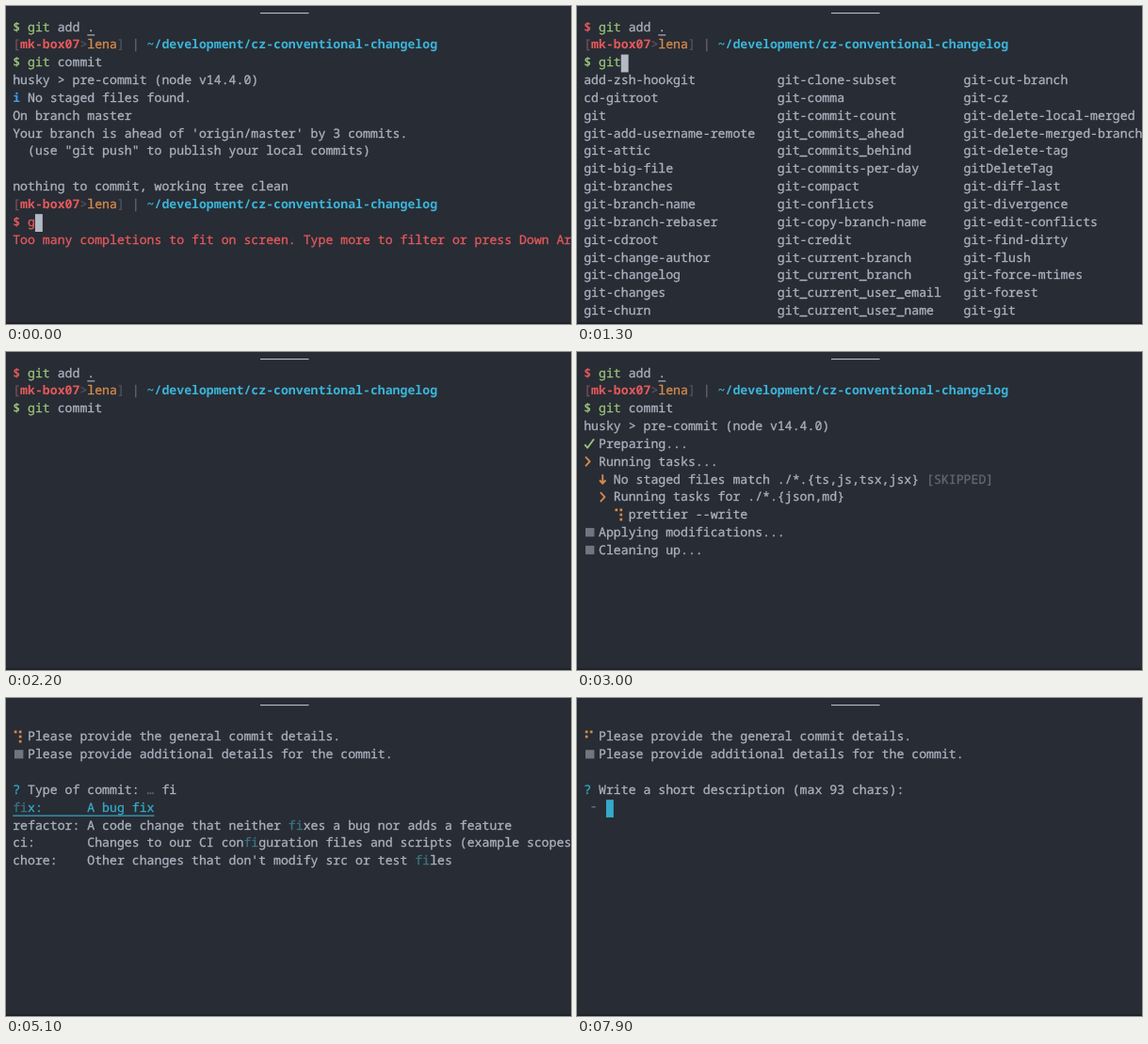
Animation, 600 px wide and 338 px high, one loop 8000 ms. Source, as an HTML page with a canvas:

```html
<!DOCTYPE html>
<html lang="en">
<head>
<meta charset="utf-8">
<title>Commit prompt</title>
<style>
  html, body { margin: 0; width: 100%; height: 100%; overflow: hidden; background: #282c34; }
  canvas { display: block; width: 600px; height: 338px; }
</style>
</head>
<body>
<canvas id="stage"></canvas>
<script>
const W = 600, H = 338, LOOP = 8000;
const X0 = 7.2, Y0 = 13.2, CW = 7.91, RH = 18.84, BASE = 13.4;
const FACE = '13.18px "Noto Sans Mono", "DejaVu Sans Mono", monospace';
const C = {
  bg: '#282c34', text: '#abb2bf', red: '#e4595c', green: '#98c379', orange: '#d58a4c',
  path: '#3cb4d8', cyan: '#35a9c8', match: '#3b7384', dim: '#626873', faint: '#57505a',
  bracket: '#75505a', square: '#70767f', blue: '#3f9bee', cursor: '#b3bac5'
};

const canvas = document.getElementById('stage');
const ctx = canvas.getContext('2d');
const dpr = window.devicePixelRatio || 1;
canvas.width = W * dpr;
canvas.height = H * dpr;

const COMMANDS = [
  'add-zsh-hookgit cd-gitroot git git-add-username-remote git-attic git-big-file git-branches git-branch-name git-branch-rebaser git-cdroot git-change-author git-changelog git-changes git-churn',
  'git-clone-subset git-comma git-commit-count git_commits_ahead git_commits_behind git-commits-per-day git-compact git-conflicts git-copy-branch-name git-credit git-current-branch git_current_branch git_current_user_email git_current_user_name',
  'git-cut-branch git-cz git-delete-local-merged git-delete-merged-branches git-delete-tag gitDeleteTag git-diff-last git-divergence git-edit-conflicts git-find-dirty git-flush git-force-mtimes git-forest git-git'
].map(s => s.split(' '));
const COMMAND_COLS = [0, 26, 51];

const SUBCOMMANDS = [
  ['column', 'display data in columns'],
  ['commit-graph', 'write and verify Git commit-graph files'],
  ['commit', 'record changes to repository'],
  ['commit-tree', 'create new commit object'],
  ['config', 'get and set repository or global options'],
  ['copy-branch-name', 'Copy the current branch name to the clipboard (pbcopy)'],
  ['count-objects', 'count unpacked objects and display their disk consumption'],
  ['cvsexportcommit', 'export a single commit to a CVS checkout'],
  ['get-tar-commit-id', 'extract commit ID from an archive created using git-archive'],
  ['incoming', 'Fetch remote tracking branch, and list incoming commits'],
  ['rank-contributors', 'A simple script to trace through the logs and rank contributors'],
  ['run-command-on-revisions', 'Runs a given command over a range of Git revisions'],
  ['verify-commit', 'check GPG signature of commits']
];

const TYPES = [
  ['feat', 'A new feature'],
  ['fix', 'A bug fix'],
  ['docs', 'Documentation only changes'],
  ['style', 'Changes that do not affect the meaning of the code (white-space, formatting)'],
  ['refactor', 'A code change that neither fixes a bug nor adds a feature'],
  ['perf', 'A code change that improves performance'],
  ['test', 'Adding missing tests or correcting existing tests'],
  ['build', 'Changes that affect the build system or external dependencies (example scopes)'],
  ['ci', 'Changes to our CI configuration files and scripts (example scopes)'],
  ['chore', "Other changes that don't modify src or test files"],
  ['revert', 'Reverts a previous commit']
].map(([name, info]) => (name + ':').padEnd(10) + info);

const cellX = col => X0 + col * CW;
const cellY = row => Y0 + row * RH;

// Writes text on the terminal grid and returns the next free column.
function put(row, col, text, color = C.text, bold = false) {
  ctx.font = (bold ? 'bold ' : '') + FACE;
  ctx.fillStyle = ctx.strokeStyle = color;
  ctx.lineWidth = bold ? 0.01 : 0.3;
  const y = cellY(row) + BASE;
  for (const ch of text) {
    if (ch !== ' ') {
      ctx.fillText(ch, cellX(col), y);
      ctx.strokeText(ch, cellX(col), y);
    }
    col++;
  }
  return col;
}

function box(x, y, w, h, color) {
  ctx.fillStyle = color;
  ctx.fillRect(x, y, w, h);
}

// Draws an open line through points given relative to a cell.
function mark(row, col, color, points) {
  ctx.strokeStyle = color;
  ctx.lineWidth = 1.9;
  ctx.beginPath();
  for (const [x, y] of points) ctx.lineTo(cellX(col) + x, cellY(row) + y);
  ctx.stroke();
}

const tick = row => mark(row, 0, C.green, [[1, 9.8], [4, 13.2], [10.8, 4]]);
const chevron = (row, col) => mark(row, col, C.orange, [[1.8, 4], [6.4, 9], [1.8, 14]]);

function downArrow(row, col) {
  mark(row, col, C.orange, [[4.2, 4], [4.2, 13.5]]);
  mark(row, col, C.orange, [[1, 10], [4.2, 13.5], [7.4, 10]]);
}

function underline(row, col, count, color) {
  box(cellX(col), cellY(row) + 17.1, count * CW, 1.2, color);
}

function cursor(row, col, color = C.cursor) {
  box(cellX(col), cellY(row) + 0.7, CW, RH, color);
}

function square(row) {
  box(9, cellY(row) + 4.3, 9.4, 9.2, C.square);
}

// Braille spinner: each string lists the lit dots, 1-3 left, 4-6 right.
const SPIN = ['124', '145', '1456', '456', '3456', '356', '236', '1236', '123', '1234'];
function spinner(row, col, step) {
  for (const d of SPIN[((step % 10) + 10) % 10]) {
    const x = cellX(col) + (d > 3 ? 6.6 : 1.6);
    const y = cellY(row) + 2.6 + ((d - 1) % 3) * 5.1;
    box(x, y, 2.7, 2.7, C.orange);
  }
}

function promptLine(row) {
  let c = put(row, 0, '[', C.bracket);
  c = put(row, c, 'mk-box07', C.red, true);
  c = put(row, c, '>', C.faint);
  c = put(row, c, 'lena', C.orange);
  c = put(row, c, '] ', C.faint);
  c = put(row, c, '| ', C.dim);
  put(row, c, '~/development/cz-conventional-changelog', C.path, true);
}

function command(row, text, ok, active) {
  put(row, 0, '$', ok ? C.green : C.red, true);
  const known = text.startsWith('git');
  const head = known ? 3 : text.length;
  if (active) cursor(row, 2 + text.length);
  put(row, 2, text.slice(0, head), known ? C.green : C.red);
  put(row, 2 + head, text.slice(head));
  if (text.endsWith(' .')) underline(row, 1 + text.length, 1, C.text);
}

function tooMany(row) {
  put(row, 0, 'Too many completions to fit on screen. Type more to filter or press Down Arrow', C.red);
}

function commandList(row) {
  COMMANDS.forEach((names, i) => names.forEach((n, j) => put(row + j, COMMAND_COLS[i], n)));
}

function subList(row, query) {
  SUBCOMMANDS.filter(([name]) => query === 'com' || name.includes(query))
    .forEach(([name, info], i) => {
      put(row + i, 0, name);
      put(row + i, 26, info);
    });
}

function history() {
  command(0, 'git add .', true);
  promptLine(1);
  command(2, 'git commit', true);
  put(3, 0, 'husky > pre-commit (node v14.4.0)');
  put(4, 0, 'i', C.blue, true);
  put(4, 2, 'No staged files found.');
  put(5, 0, 'On branch master');
  put(6, 0, "Your branch is ahead of 'origin/master' by 3 commits.");
  put(7, 2, '(use "git push" to publish your local commits)');
  put(9, 0, 'nothing to commit, working tree clean');
  promptLine(10);
}

function typeAdd(t) {
  const text = 'git add .'.slice(0, 1 + Math.floor(t / 100));
  if (t < 200) {
    history();
    command(11, text, false, true);
    tooMany(12);
    return;
  }
  put(0, 0, 'nothing to commit, working tree clean');
  promptLine(1);
  command(2, text, false, t < 900);
  if (t < 300) commandList(3);
  if (t >= 900) {
    promptLine(3);
    command(4, 'gi'.slice(0, (t - 900) / 100), true, true);
    if (t >= 1000) tooMany(5);
  }
}

function typeCommit(t) {
  command(0, 'git add .', false);
  promptLine(1);
  const count = t < 1400 ? 3 : t < 1900 ? Math.min(7, 4 + Math.floor((t - 1400) / 100))
    : Math.min(10, 8 + Math.floor((t - 1900) / 100));
  const text = 'git commit'.slice(0, count);
  command(2, text, true, t < 2200);
  if (count === 3) commandList(3);
  else if (count >= 7 && t < 2200) subList(3, text.slice(4));
}

function tasks(t) {
  const step = Math.round(t / 100) - 28;
  typeCommit(2200);
  if (t < 2400) return;
  put(3, 0, 'husky > pre-commit (node v14.4.0)');
  if (t < 2600) return;
  put(4, 2, 'Preparing...');
  put(5, 2, 'Running tasks...');
  if (t < 2800) {
    spinner(4, 0, step);
    square(5);
    put(6, 2, 'Applying modifications...');
    square(6);
    put(7, 2, 'Cleaning up...');
    square(7);
    return;
  }
  tick(4);
  chevron(5, 0);
  downArrow(6, 2);
  const c = put(6, 4, 'No staged files match ./*.{ts,js,tsx,jsx} ');
  put(6, c, '[SKIPPED]', C.dim);
  chevron(7, 2);
  put(7, 4, 'Running tasks for ./*.{json,md}');
  spinner(8, 4, step);
  put(8, 6, 'prettier --write');
  square(9);
  put(9, 2, 'Applying modifications...');
  square(10);
  put(10, 2, 'Cleaning up...');
}

function choice(row, line, query, selected) {
  const color = selected ? C.cyan : C.text;
  // Only the first hit in the line is marked.
  const at = query ? line.indexOf(query) : -1;
  if (at < 0) put(row, 0, line, color);
  else {
    let c = put(row, 0, line.slice(0, at), color);
    c = put(row, c, query, C.match);
    put(row, c, line.slice(at + query.length), color);
  }
  if (selected) underline(row, 0, line.length, C.cyan);
}

function details(t) {
  spinner(1, 0, Math.round(t / 100) - 39);
  put(1, 2, 'Please provide the general commit details.');
  square(2);
  put(2, 2, 'Please provide additional details for the commit.');
  if (t < 3700) return;
  put(4, 0, '?', C.cyan);
  if (t >= 6900) {
    put(4, 2, 'Write a short description (max 93 chars):');
    box(15.5, 115, 4.2, 1.6, C.dim);
    cursor(5, 3, C.cyan);
    return;
  }
  put(4, 2, 'Type of commit:');
  put(4, 18, '…', C.dim);
  const query = 'fix'.slice(0, t < 4900 ? 0 : 1 + Math.floor((t - 4900) / 200));
  put(4, 20, query);
  let pick = 0;
  if (t >= 3900 && t < 4900) pick = 1;
  if (t >= 5900 && t < 6500) pick = 1;
  TYPES.filter(line => line.includes(query))
    .forEach((line, i) => choice(5 + i, line, query, i === pick));
}

function draw(now) {
  const t = Math.floor((now % LOOP) / 100) * 100;
  ctx.setTransform(dpr, 0, 0, dpr, 0, 0);
  ctx.textRendering = 'geometricPrecision';
  ctx.lineJoin = 'round';
  box(0, 0, W, H, C.bg);
  box(270, 7, 51.5, 1.1, '#b9bcc2');
  if (t < 1200) typeAdd(t);
  else if (t < 2200) typeCommit(t);
  else if (t < 3600) tasks(t);
  else details(t);
  box(0, 336.5, W, 1.5, '#1d1f23');
  requestAnimationFrame(draw);
}
requestAnimationFrame(draw);
</script>
</body>
</html>
```
